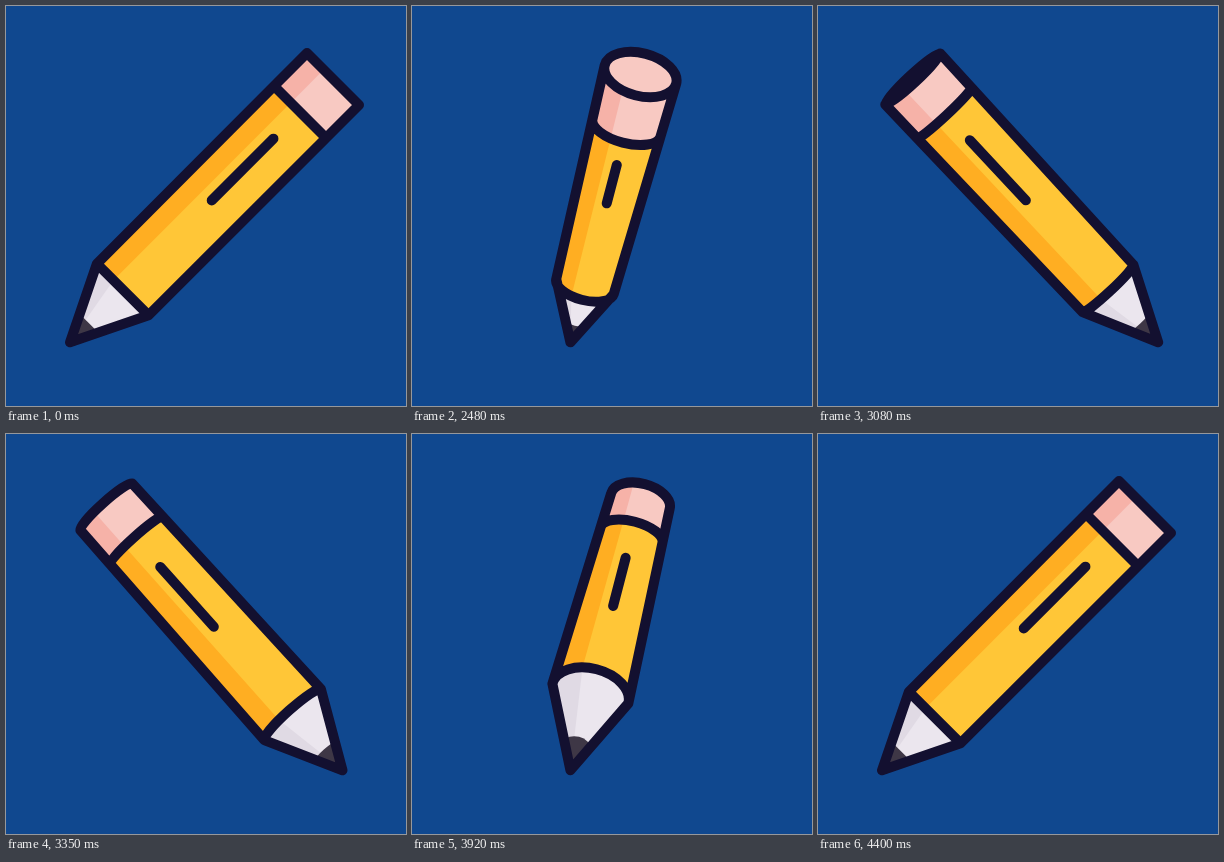
Animation of 400 by 400 pixels, one loop 4.43 s. Source, as an HTML page:

```html
<!DOCTYPE html>
<html lang="en">
<head>
<meta charset="utf-8">
<title>Spinning pencil</title>
<style>
  html, body { margin: 0; width: 100%; height: 100%; overflow: hidden; background: #10488f; }
  svg { display: block; width: 100vw; height: 100vh; }
  .ink { fill: none; stroke: #131030; stroke-width: 10; stroke-linecap: round; stroke-linejoin: round; }
</style>
</head>
<body>
<svg viewBox="0 0 400 400">
  <rect width="400" height="400" fill="#10488f"/>
  <path id="eraser" fill="#f8c9c2"/>
  <path id="eraserShade" fill="#f6b2a8"/>
  <path id="cap" fill="#f8c9c2"/>
  <path id="wood" fill="#ebe6ee"/>
  <path id="woodShade" fill="#e0dae4"/>
  <path id="lead" fill="#3e3746"/>
  <path id="body" fill="#ffc637"/>
  <path id="bodyShade" fill="#ffae22"/>
  <path id="lines" class="ink"/>
</svg>
<script>
const LOOP = 4430, REST = 2000, STEP = 30, DEG_PER_MS = 0.15;
const AXIS_X = 205.5, SPLIT = 0.32;

const parts = {};
for (const p of document.querySelectorAll('path')) parts[p.id] = p;
const set = (id, d) => parts[id].setAttribute('d', d);
const pt = p => p[0].toFixed(2) + ' ' + p[1].toFixed(2);
const lerp = (a, b, u) => a + (b - a) * u;
const mix = (a, b, u) => [lerp(a[0], b[0], u), lerp(a[1], b[1], u)];

function draw(angle) {
  const c = Math.cos(angle), s = Math.sin(angle), q = s * s, cube = s * q;
  const near = s > 0 ? 0 : 1; // sweep of the visible rims

  const tip = [AXIS_X - 141.5 * c * (1 + 0.094 * q * q), 336.3];
  const end = [AXIS_X + 121.5 * c * (1 - 0.43 * q), 73 + cube - 6.5 * q * q];
  const len = Math.hypot(end[0] - tip[0], end[1] - tip[1]);
  const ax = [(end[0] - tip[0]) / len, (end[1] - tip[1]) / len];
  const side = [-ax[1], ax[0]];
  const tilt = Math.atan2(side[1], side[0]) * 180 / Math.PI;

  // Round cross-section, always square to the pencil's axis
  function ring(mid, r, ratio) {
    const at = (x, y) => [mid[0] + side[0] * x + ax[0] * y, mid[1] + side[1] * x + ax[1] * y];
    const ry = r * Math.abs(ratio), x = 2 * SPLIT - 1;
    const bow = ry * Math.sqrt(1 - x * x) * (near ? 1 : -1);
    return {
      mid, r, ratio, l: at(-r, 0), r1: at(r, 0), cut: at(r * x, bow),
      arc: (sweep, to) => `A${r.toFixed(2)} ${ry.toFixed(3)} ${tilt.toFixed(2)} 0 ${sweep} ${pt(to)}`
    };
  }

  const onAxis = y => mix(tip, end, (tip[1] - y) / (tip[1] - end[1]));
  const baseY = 283.5 + 12.2 * cube - 14.9 * q;
  const jointY = 106 + 12.2 * cube + 6.1 * q;
  const baseR = (73 - 10 * s - 4.5 * q) / 2;
  const endR = (73.5 + 7 * s - 7 * q) / 2;
  const jointR = lerp(baseR, endR, (baseY - jointY) / (baseY - end[1]));
  const lean = (s + cube) / 2;

  const base = ring(onAxis(baseY), baseR, lean * (0.61 - 0.1 * s));
  const joint = ring(onAxis(jointY), jointR, lean * 0.48);
  const top = ring(end, endR, lean * 0.64);
  const leadSize = 0.36 + 0.03 * s;
  const lead = ring(mix(tip, base.mid, leadSize), baseR * leadSize, base.ratio);

  const band = (a, b, sweep) =>
    `M${pt(a.l)}${a.arc(near, a.r1)}L${pt(b.r1)}${b.arc(1 - sweep, b.l)}Z`;
  const shade = (a, b) =>
    `M${pt(a.l)}${a.arc(near, a.cut)}L${pt(b.cut)}${b.arc(1 - near, b.l)}Z`;
  const rim = a => `M${pt(a.l)}${a.arc(near, a.r1)}`;
  const cone = a => `${rim(a)}L${pt(tip)}Z`;

  set('eraser', band(joint, top, 1));
  set('eraserShade', shade(joint, top));
  set('cap', near ? '' : `M${pt(top.l)}${top.arc(1, top.r1)}${top.arc(1, top.l)}Z`);
  set('wood', cone(base));
  set('woodShade', `M${pt(base.l)}${base.arc(near, base.cut)}L${pt(tip)}Z`);
  set('lead', cone(lead));
  set('body', band(base, joint, near));
  set('bodyShade', shade(base, joint));

  const m1 = mix(joint.mid, base.mid, 0.15 + 0.052 * cube + 0.043 * q);
  const m2 = mix(joint.mid, base.mid, 0.498 + 0.0165 * cube - 0.045 * q * q);
  set('lines',
    `M${pt(tip)}L${pt(base.l)}L${pt(joint.l)}L${pt(top.l)}${top.arc(1, top.r1)}` +
    `L${pt(joint.r1)}L${pt(base.r1)}Z` +
    rim(base) + rim(joint) + (near ? '' : rim(top)) +
    `M${pt(m1)}L${pt(m2)}`);
}

const start = performance.now();
function tick(now) {
  const t = Math.max(0, now - start) % LOOP;
  const spin = Math.max(0, Math.floor((t - REST) / STEP) * STEP);
  draw((spin * DEG_PER_MS % 360) * Math.PI / 180);
  requestAnimationFrame(tick);
}
tick(start);
</script>
</body>
</html>
```
